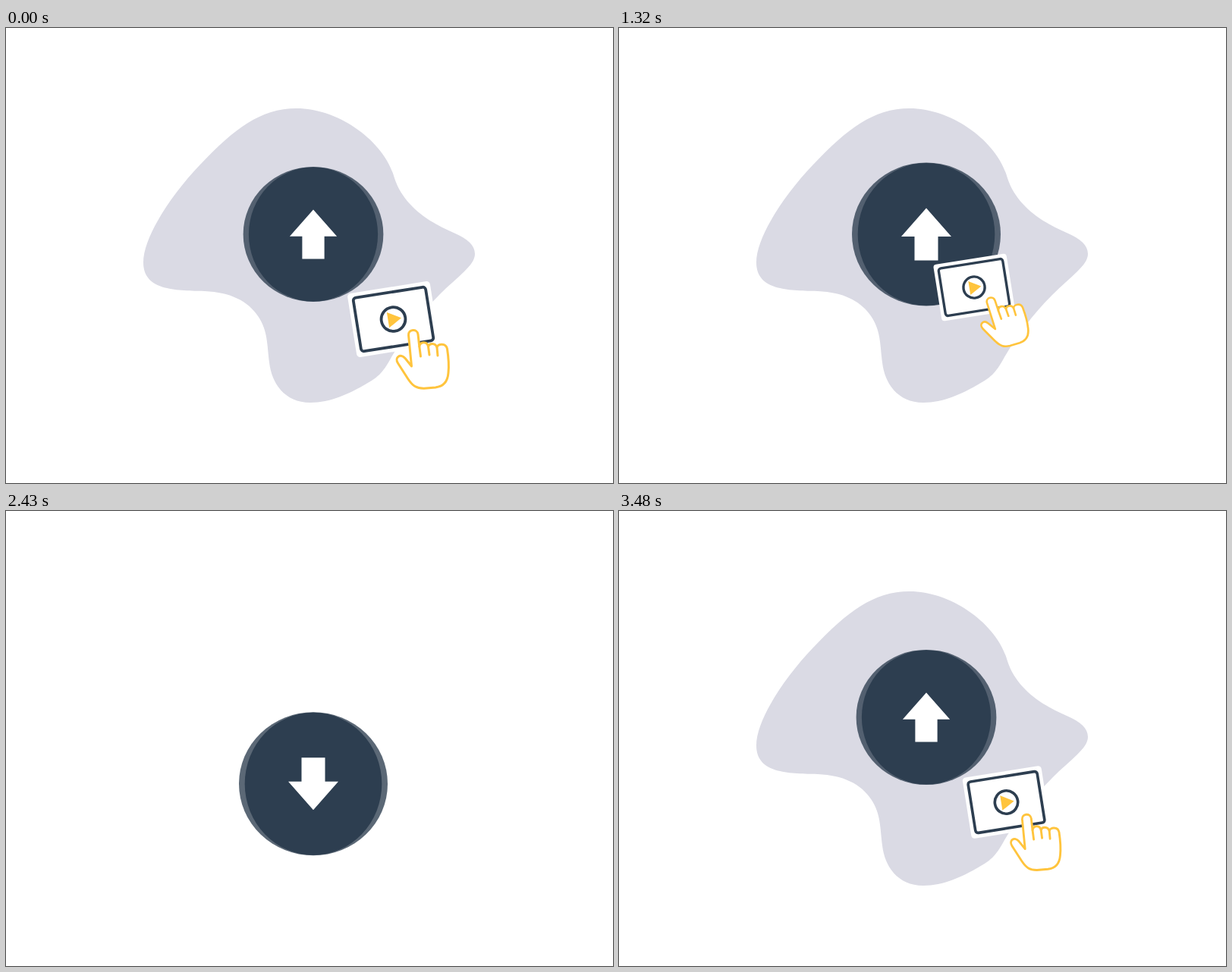
Animation of 800 by 600 pixels, one loop 3510 ms. Source, as an HTML page:

```html
<!DOCTYPE html>
<html lang="en">
<head>
<meta charset="utf-8">
<title>Drag to upload</title>
<style>
  html, body { margin: 0; width: 100%; height: 100%; overflow: hidden; background: #fff; }
  svg { display: block; width: 100vw; height: 100vh; }

  :root {
    --navy: #2d3e50;
    --gold: #ffc43d;
  }

  /* The cycle begins with the blob popping in, 600 ms before the loop point. */
  .blob, .disc, .disc-size, .card, .card-size, .hand, .hand-size {
    animation-duration: 3510ms;
    animation-delay: -600ms;
    animation-iteration-count: infinite;
    animation-timing-function: linear;
  }
  .blob { animation-name: blob; }
  .disc { animation-name: fall, flip; }
  .disc-size { animation-name: disc; }
  .card { animation-name: card-move; }
  .card-size { animation-name: card; }
  .hand { animation-name: hand-move, hand-turn; }
  .hand-size { animation-name: hand; }

  /* Pops overshoot by 13%; exits accelerate. */
  @keyframes blob {
    0% { scale: 0; }
    .256% { scale: 0; animation-timing-function: cubic-bezier(.333, 1.667, .667, 1); }
    15.64% { scale: 1; }
    62.393% { scale: 1; animation-timing-function: cubic-bezier(.333, 0, .667, .11); }
    73.504%, 100% { scale: 0; }
  }
  @keyframes disc {
    0% { scale: 0; }
    8.12% { scale: 0; animation-timing-function: cubic-bezier(.333, 1.667, .667, 1); }
    23.504% { scale: .834; }
    38.034% { scale: .834; animation-timing-function: ease-in-out; }
    47.863% { scale: 1; }
    88.889% { scale: 1; animation-timing-function: ease-in; }
    92.308%, 100% { scale: 0; }
  }
  @keyframes fall {
    0% { translate: 0 0; }
    82.906% { translate: 0 0; animation-timing-function: ease-in-out; }
    89.744%, 100% { translate: 0 173px; }
  }
  @keyframes flip {
    0% { rotate: 0deg; }
    82.906% { rotate: 0deg; animation-timing-function: ease-in-out; }
    85.9%, 100% { rotate: 180deg; }
  }
  @keyframes card {
    0% { scale: 0; }
    10.627% { scale: 0; animation-timing-function: cubic-bezier(.333, 1.667, .667, 1); }
    26.011% { scale: 1; }
    51.282% { scale: 1; animation-timing-function: cubic-bezier(.333, 0, .667, .11); }
    64.359%, 100% { scale: 0; }
  }
  @keyframes card-move {
    0% { translate: 0 0; }
    23.932% { translate: 0 0; animation-timing-function: ease-in-out; }
    29.06% { translate: 1px 4.5px; animation-timing-function: ease-in-out; }
    41.88%, 100% { translate: -42.5px -42px; }
  }
  @keyframes hand {
    0% { scale: 0; }
    10.627% { scale: 0; animation-timing-function: cubic-bezier(.333, 1.667, .667, 1); }
    26.011% { scale: 1; }
    51.282% { scale: 1; animation-timing-function: cubic-bezier(.333, 0, .667, .11); }
    63.248%, 100% { scale: 0; }
  }
  @keyframes hand-move {
    0% { translate: 0 0; }
    25.641% { translate: 0 0; animation-timing-function: ease-in-out; }
    29.06% { translate: .5px 1px; animation-timing-function: ease-in-out; }
    41.88%, 100% { translate: -42.5px -50.5px; }
  }
  @keyframes hand-turn {
    0% { rotate: 0deg; }
    21.368% { rotate: 0deg; animation-timing-function: ease-in-out; }
    34.188%, 100% { rotate: -12deg; }
  }
</style>
</head>
<body>
<svg viewBox="0 0 800 600">
  <g transform="translate(400 300)">
    <g class="blob">
      <path transform="translate(-400 -300)" fill="#dadae4" d="M383 106C438 106 499 149 512 198C524 235 559 257 590 270
        C608 278 618 286 618 298C618 313 596 327 571 352C545 378 525 405 508 434C496 456 490 461 470 472
        C452 482 428 494 401 494C367 494 350 468 347 441C344 417 345 399 332.5 380.5C319 360 296 348.5 262 347
        C222 346 181 346 181 309C181 274 221 216 258 178C300 134 335 106 383 106Z"/>
    </g>
  </g>

  <g transform="translate(405 272)">
    <g class="disc"><g class="disc-size">
      <ellipse rx="98" ry="94.5" fill="var(--navy)" fill-opacity=".78"/>
      <ellipse rx="90.3" ry="94" fill="var(--navy)"/>
      <path fill="#fff" d="M0-34.5L33 3H15.5V34.5H-15.5V3H-33Z"/>
    </g></g>
  </g>

  <g transform="translate(510.5 384)">
    <g class="card"><g class="card-size">
      <g transform="rotate(-9)">
        <rect x="-50.5" y="-39" width="101" height="78" rx="4" fill="#fff"/>
        <g fill="none" stroke="var(--navy)" stroke-width="3.5">
          <rect x="-44.3" y="-32.8" width="88.6" height="65.6" rx="3.5"/>
          <circle r="14.6"/>
        </g>
        <path fill="var(--gold)" d="M-6.5-9.5L9.8 0L-6.5 9.5Z"/>
      </g>
    </g></g>
  </g>

  <g transform="translate(549.5 436.5)">
    <g class="hand"><g class="hand-size">
      <g transform="scale(.917) translate(-549.5 -436.5)" fill="#fff" stroke="var(--gold)" stroke-width="3"
         stroke-linecap="round" stroke-linejoin="round">
        <path d="M534.5 446L530.5 405C530 397 542 396 543 404L544.8 420C546 413 555 413 556.5 420
          C558 415 566 415 568 421C569 416 580 415 581.5 423C583.5 436 584 446 583 455
          C582 468 575 473 566 474L551 475.3C541 475.5 536 472 530 463L516.5 442C511.5 434 520 428.5 526 435.5Z"/>
        <path fill="none" d="M544.8 420L546.5 433M556.5 420L558 431M568 421L569 432"/>
      </g>
    </g></g>
  </g>
</svg>
</body>
</html>
```
